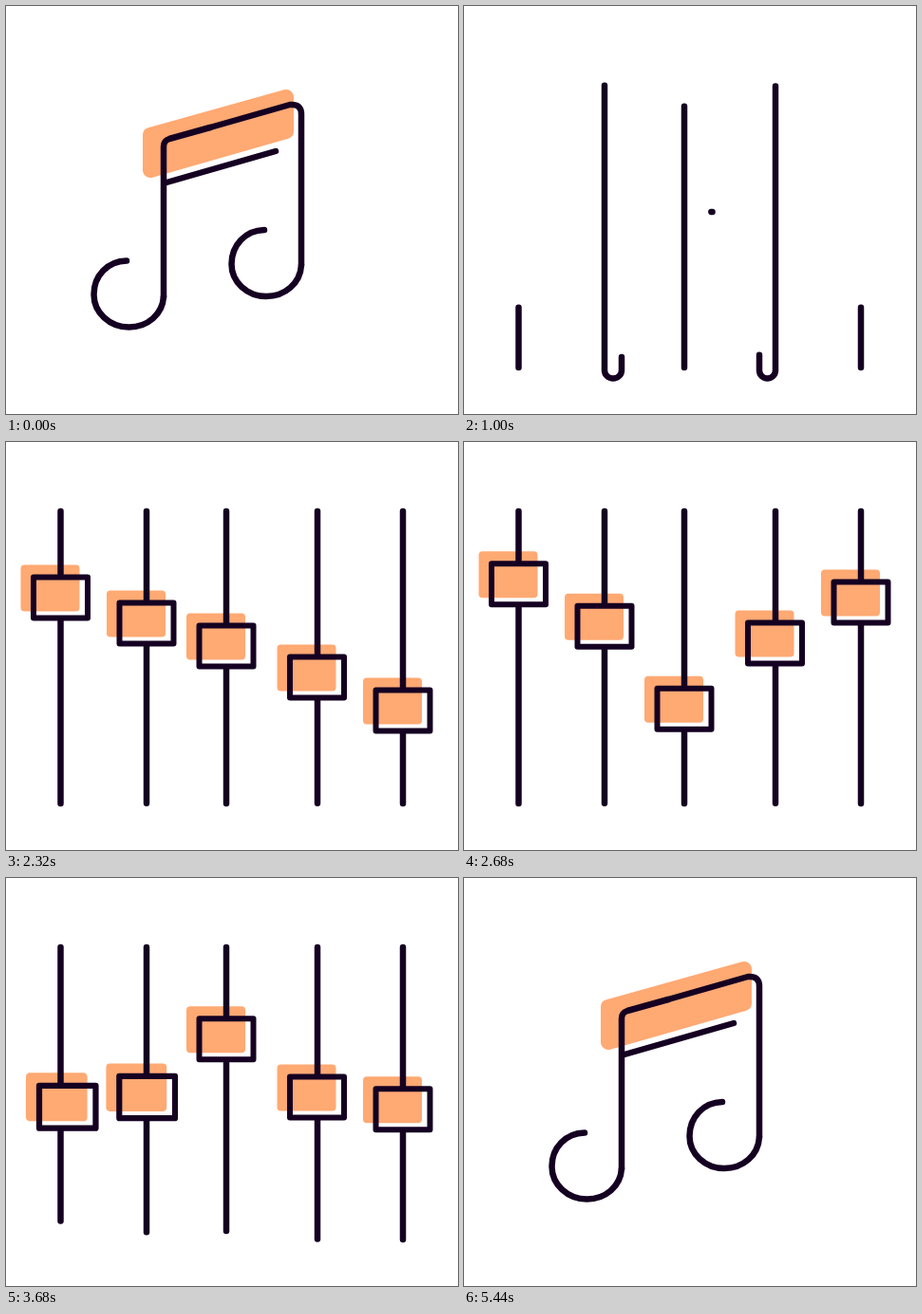
An HTML page that plays this animation: 476x430 px, repeating every 5.52 s.

```html
<!DOCTYPE html>
<html lang="en">
<head>
<meta charset="utf-8">
<title>Note and mixer</title>
<style>
  html, body { margin: 0; width: 100%; height: 100%; overflow: hidden; background: #fff; }
  svg { display: block; width: 476px; height: 430px; }
  .ink { fill: none; stroke: #150022; stroke-width: 6.5; stroke-linecap: round; stroke-linejoin: round; }
  .fill { fill: #ffa973; }
</style>
</head>
<body>
<svg viewBox="0 0 476 430">
  <path id="slab" class="fill" stroke="#ffa973" stroke-width="16" stroke-linejoin="round" d="M152 136L295 96V132L152 173Z"/>
  <g id="shades"></g>
  <g id="lines"></g>
  <g id="knobs"></g>
</svg>
<script>
const LOOP = 5520, TOP = 73, BOTTOM = 381, SPAN = BOTTOM - TOP;
const get = id => document.getElementById(id);

function add(parent, tag, attrs) {
  const el = document.createElementNS('http://www.w3.org/2000/svg', tag);
  set(el, attrs);
  return get(parent).appendChild(el);
}
function set(el, attrs) {
  for (const k in attrs) el.setAttribute(k, attrs[k]);
}
const show = (el, on) => { el.style.display = on ? '' : 'none'; };

const clamp = u => Math.min(1, Math.max(0, u));
const inOut = u => u < .5 ? 4 * u ** 3 : 1 - 4 * (1 - u) ** 3;
const backOut = u => 1 + 2.2 * (u - 1) ** 3 + 1.2 * (u - 1) ** 2;
const backIn = u => 1 - backOut(1 - u);
const ramp = (t, from, to, ease = inOut) => ease(clamp((t - from) / (to - from)));
const mix = (a, b, u) => a + (b - a) * u;

// Eased interpolation through rows of [time, values]
function pose(t, rows) {
  let i = 0;
  while (i < rows.length - 2 && t >= rows[i + 1][0]) i++;
  const [t0, a] = rows[i], [t1, b] = rows[i + 1];
  const u = ramp(t, t0, t1);
  return a.map((v, k) => mix(v, b[k], u));
}

function trim(el, from, to) {
  const len = to - from;
  show(el, len > .5);
  set(el, { 'stroke-dasharray': `${Math.max(len, 0)} 2000`, 'stroke-dashoffset': -from });
}

const sliderX = [57.5, 148, 232, 327.5, 418];
const knobY = [
  [1640, [274, 204, 170, 240, 270]],
  [2300, [164, 191, 215, 248, 283]],
  [2880, [147, 195, 294, 205, 147]],
  [3440, [264, 252, 180, 252, 267]],
  [4160, [112, 112, 112, 112, 112]]
];
const barIn = [
  [3560, [232, 381, 232, 73]],
  [4080, [232, 200, 232, 73]],
  [4520, [203, 171, 238, 155]],
  [5400, [169, 186, 284, 153]]
];
const barOut = [
  [280, [169, 186, 284, 153]],
  [1060, [260.5, 217, 261.5, 217]]
];

const ink = d => add('lines', 'path', { class: 'ink', d });
const sides = [
  {
    slot: 1, foot: 306, start: 300,
    stem: ink('M215 128L172 140Q166 142 166 148V384A9 8.5 0 0 1 148 384V73'),
    hook: ink('M166 306C165 325 149 338.5 129.5 338.5C109 338.5 92.5 323 92.5 304C92.5 284 107 269 127 268.5')
  },
  {
    slot: 3, foot: 273, start: 230,
    stem: ink('M215 128L299 104Q311 103 311 114V384A8.5 8.5 0 0 0 328 384V73'),
    hook: ink('M311 273C310 292 294 306 274 306C254 306 237.5 291 237.5 272C237.5 252 252 236.5 272 236')
  }
];
for (const s of sides) {
  s.len = s.stem.getTotalLength();
  s.hookLen = s.hook.getTotalLength();
  s.footAt = s.len - 338 - (384 - s.foot);
}

const plain = [0, 2, 4].map(i => ({ i, el: add('lines', 'line', { class: 'ink' }) }));
const bar = add('lines', 'line', { class: 'ink' });

const sliders = sliderX.map(x => {
  const knob = add('knobs', 'g', {});
  knob.innerHTML = '<rect x="-28.5" y="-21.5" width="57" height="43" fill="#fff"/>' +
    '<path class="fill" d="M-28-21H20V10.5Q20 14.5 16 14.5H-28Z"/>' +
    '<rect class="ink" x="-28.5" y="-21.5" width="57" height="43" style="stroke-width:6"/>';
  const shade = add('shades', 'rect', { class: 'fill', x: -42, y: -34.5, width: 62, height: 49, rx: 4 });
  return { x, knob, shade };
});

const retract = (t, i) => ramp(t, 3480 + 55 * i, 4280 + 55 * i);

function drawNote(t) {
  const size = t < 2000 ? 1 - ramp(t, 220, 520) : ramp(t, 4860, 5180);
  set(get('slab'), { transform: `translate(223.5 134.5) scale(${size}) translate(-223.5 -134.5)` });
  show(get('slab'), size > .01);

  for (const s of sides) {
    if (t >= 4540) {
      trim(s.stem, 0, s.footAt * ramp(t, 4540, 5160));
      trim(s.hook, 0, s.hookLen * ramp(t, 4960, 5400));
    } else {
      const tail = (s.len - SPAN) * ramp(t, s.start, 1340) + SPAN * retract(t, s.slot);
      trim(s.stem, tail, mix(s.footAt, s.len, ramp(t, 400, 1140)));
      trim(s.hook, 0, s.hookLen * (1 - ramp(t, 200, 520)));
    }
  }

  const [x1, y1, x2, y2] = pose(t, t < 2000 ? barOut : barIn);
  set(bar, { x1, y1, x2, y2 });
  show(bar, t < 1040 || t >= 3560);
}

function drawMixer(t) {
  for (const { i, el } of plain) {
    const grow = i === 2 ? ramp(t, 500, 1214) : ramp(t, 700, 1510);
    const x = sliderX[i];
    const y1 = BOTTOM - SPAN * grow;
    const y2 = i === 2 ? BOTTOM : BOTTOM - SPAN * retract(t, i);
    set(el, { x1: x, x2: x, y1, y2 });
    show(el, grow > 0 && y2 - y1 > .5 && !(i === 2 && t >= 3560));
  }

  const ys = pose(t, knobY);
  sliders.forEach(({ x, knob, shade }, i) => {
    const out = 3520 + 90 * i;
    const size = ramp(t, 1080, 1500, backOut) * (1 - ramp(t, out, out + 360, backIn));
    const dx = .5 + 12 * ramp(t, out, out + 300);
    const transform = `translate(${x + dx - .5} ${ys[i]}) scale(${Math.max(size, 0)})`;
    for (const el of [knob, shade]) {
      set(el, { transform });
      show(el, size > .01);
    }
  });
}

function frame() {
  const t = performance.now() % LOOP;
  drawNote(t);
  drawMixer(t);
  requestAnimationFrame(frame);
}
frame();
</script>
</body>
</html>
```
